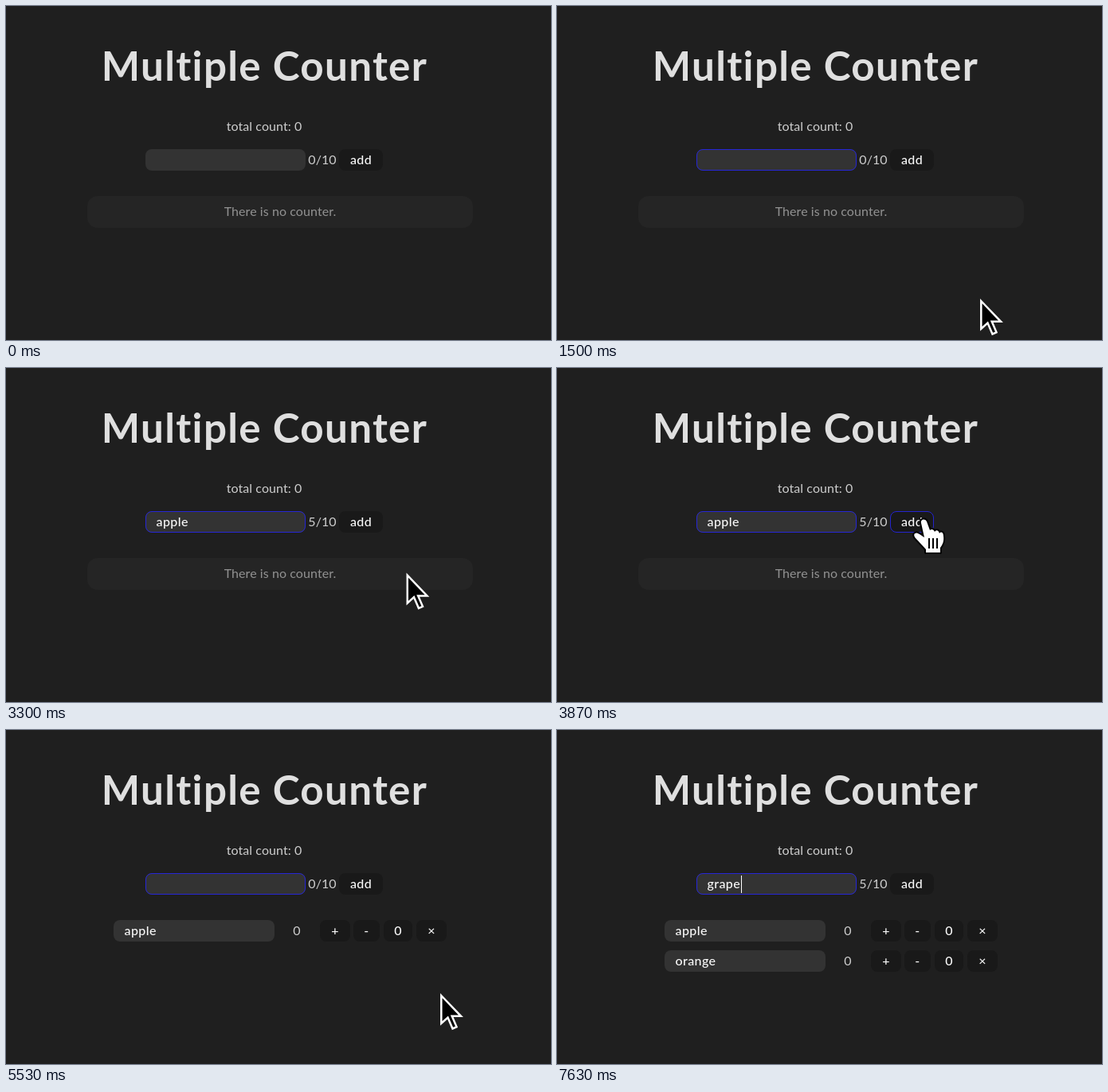
Recreate the animation shown at these times as an HTML page with a canvas. Size 684 by 420 pixels, loop 8000 ms.

```html
<!DOCTYPE html>
<html lang="en">
<head>
<meta charset="utf-8">
<title>Multiple Counter</title>
<style>
  html, body { margin: 0; width: 100%; height: 100%; overflow: hidden; background: #1f1f1f; }
  canvas { display: block; width: 684px; height: 420px; }
</style>
</head>
<body>
<canvas id="stage"></canvas>
<script>
const W = 684, H = 420, LOOP = 8000, FADE = 250, BLINK = 500;
const FONT = 'Lato, "Open Sans", sans-serif';
const FIELD = '#333', BUTTON = '#191919';

// Text styles
const TITLE = { color: '#dfdfdf', size: 51.2, weight: 700, spacing: 1.3 };
const PLAIN = { color: '#cecece', size: 16, weight: 400, spacing: 0.08 };
const MUTED = { ...PLAIN, color: '#929292' };
const BRIGHT = { color: '#fafafa', size: 16, weight: 500, spacing: 0.4 };

const canvas = document.getElementById('stage');
const ctx = canvas.getContext('2d');
const dpr = window.devicePixelRatio || 1;
canvas.width = W * dpr;
canvas.height = H * dpr;

const field = { x: 175, y: 180, w: 201, h: 27 };
const addButton = { x: 418, y: 180, w: 55, h: 27 };

// [time, text in the field]
const typing = [
  [0, ''],
  [1930, 'a'], [2070, 'ap'], [2170, 'app'], [2270, 'appl'], [2370, 'apple'], [4070, ''],
  [6070, 'o'], [6170, 'or'], [6270, 'ora'], [6330, 'oran'], [6470, 'orang'], [6530, 'orange'], [6830, ''],
  [7200, 'g'], [7400, 'gr'], [7430, 'gra'], [7570, 'grap'], [7630, 'grape']
];
const rows = [[4070, 'apple', 239], [6830, 'orange', 277]];
const focusSpans = [[1000, 4070], [5030, Infinity]];
const hoverSpans = [[3630, 4810]];

// Pointer strokes: start, end, from, control point, to
const moves = [
  [400, 1000, [470, 425], [400, 290], [322, 203]],
  [1070, 1230, [322, 203], [420, 290], [524, 375]],
  [1430, 1500, [524, 375], [528, 371], [531, 368]],
  [3000, 3670, [531, 368], [545, 310], [460, 191]],
  [4770, 4900, [460, 191], [400, 180], [335, 185]],
  [4900, 5000, [335, 185], [333, 188], [331, 190]],
  [5060, 5370, [331, 190], [430, 250], [545, 331]]
];
const visibleSpans = [[400, 1930], [3000, 6070]];

const clamp = v => Math.min(1, Math.max(0, v));
const within = (spans, t) => spans.some(([a, b]) => t >= a && t < b);
const contains = (r, [x, y]) => x >= r.x && x <= r.x + r.w && y >= r.y && y <= r.y + r.h;
const latest = (list, t) => list.filter(item => item[0] <= t).pop();

function glow(spans, t) {
  return Math.max(...spans.map(([a, b]) => clamp((t - a) / FADE) * (1 - clamp((t - b) / FADE))));
}

function box(r, fill, radius = 8) {
  ctx.fillStyle = fill;
  ctx.beginPath();
  ctx.roundRect(r.x, r.y, r.w, r.h, radius);
  ctx.fill();
}

function border(r, alpha) {
  if (alpha <= 0) return;
  ctx.globalAlpha = alpha;
  ctx.strokeStyle = '#2626d6';
  ctx.lineWidth = 1;
  ctx.beginPath();
  ctx.roundRect(r.x + 0.5, r.y + 0.5, r.w - 1, r.h - 1, 7.5);
  ctx.stroke();
  ctx.globalAlpha = 1;
}

function text(str, x, y, style, align = 'center') {
  ctx.font = `${style.weight} ${style.size}px ${FONT}`;
  ctx.letterSpacing = style.spacing + 'px';
  ctx.textAlign = align;
  ctx.fillStyle = style.color;
  ctx.fillText(str, x, y);
}

function button(label, x, y, w) {
  box({ x, y, w, h: 27 }, BUTTON);
  text(label, x + w / 2, y + 19, BRIGHT);
}

function drawRow(name, y) {
  box({ x: 135, y, w: 202, h: 27 }, FIELD);
  text(name, 148.5, y + 19, BRIGHT, 'left');
  text('0', 365, y + 19, PLAIN);
  button('+', 394, y, 38);
  button('-', 436, y, 33);
  button('0', 474, y, 36);
  button('×', 515, y, 38);
}

function drawField(t) {
  const value = latest(typing, t)[1];
  box(field, FIELD);
  border(field, glow(focusSpans, t));
  text(value, 188.5, 199, BRIGHT, 'left');
  if (within(focusSpans, t)) {
    // Keystrokes and focus restart the blink; clearing does not.
    const starts = typing.filter(k => k[1]).concat(focusSpans).map(k => k[0]);
    const since = t - Math.max(...starts.filter(s => s <= t));
    if (Math.floor(since / BLINK) % 2 === 0) {
      ctx.fillStyle = '#fff';
      ctx.fillRect(189 + Math.round(ctx.measureText(value).width), 183, 1, 22);
    }
  }
  text(value.length + '/10', 397, 199, PLAIN);
}

function pointerAt(t) {
  const [a, b, p, c, q] = latest(moves, t);
  const u = clamp((t - a) / (b - a));
  const e = 1 - (1 - u) ** 2;
  return [0, 1].map(i => (1 - e) ** 2 * p[i] + 2 * e * (1 - e) * c[i] + e * e * q[i]);
}

const arrowPath = new Path2D('M1.3 3V38L9.5 30.5L15.5 44.5L20.5 42.3L14.7 28.8H26Z');
const beamPath = new Path2D(
  'M-8-19Q0-19 0-11V11Q0 19-8 19M8-19Q0-19 0-11M0 11Q0 19 8 19M-3 1H3');
const handPath = new Path2D(
  'M-3 4C-4-1 2-2 4 2L8 13C10 11 13 12 14 15C16 12 19 13 20 17C22 14 25 16 25 20' +
  'C26 27 24 31 21 35V41H3V37C-1 33-5 28-9 24C-15 18-10 14-5 18L1 22Z');
const fingerLines = new Path2D('M7 23V36M12 23V36M17 23V36');

function stroke(path, color, width) {
  ctx.strokeStyle = color;
  ctx.lineWidth = width;
  ctx.stroke(path);
}

function drawArrow() {
  ctx.fillStyle = '#000';
  ctx.fill(arrowPath);
  stroke(arrowPath, '#fff', 2.5);
}

function drawBeam() {
  ctx.lineCap = 'square';
  stroke(beamPath, '#fff', 6);
  stroke(beamPath, '#1c1c1c', 3);
}

function drawHand() {
  ctx.lineJoin = 'round';
  stroke(handPath, '#000', 4);
  ctx.fillStyle = '#fff';
  ctx.fill(handPath);
  stroke(fingerLines, '#000', 2);
}

function drawPointer(t) {
  if (!within(visibleSpans, t)) return;
  const pos = pointerAt(t);
  ctx.save();
  ctx.translate(...pos);
  if (contains(field, pos)) drawBeam();
  else if (contains(addButton, pos)) drawHand();
  else drawArrow();
  ctx.restore();
}

function draw(t) {
  ctx.setTransform(dpr, 0, 0, dpr, 0, 0);
  ctx.fillStyle = '#1f1f1f';
  ctx.fillRect(0, 0, W, H);

  text('Multiple Counter', 324.5, 94, TITLE);
  text('total count: 0', 324, 157, PLAIN);
  drawField(t);
  button('add', addButton.x, addButton.y, addButton.w);
  border(addButton, glow(hoverSpans, t));

  const shown = rows.filter(r => r[0] <= t);
  shown.forEach(([, name, y]) => drawRow(name, y));
  if (!shown.length) {
    box({ x: 102, y: 239, w: 484, h: 40 }, '#252525', 13);
    text('There is no counter.', 344, 264, MUTED);
  }
  drawPointer(t);
}

function tick(now) {
  draw(now % LOOP);
  requestAnimationFrame(tick);
}
draw(0);
requestAnimationFrame(tick);
</script>
</body>
</html>
```
